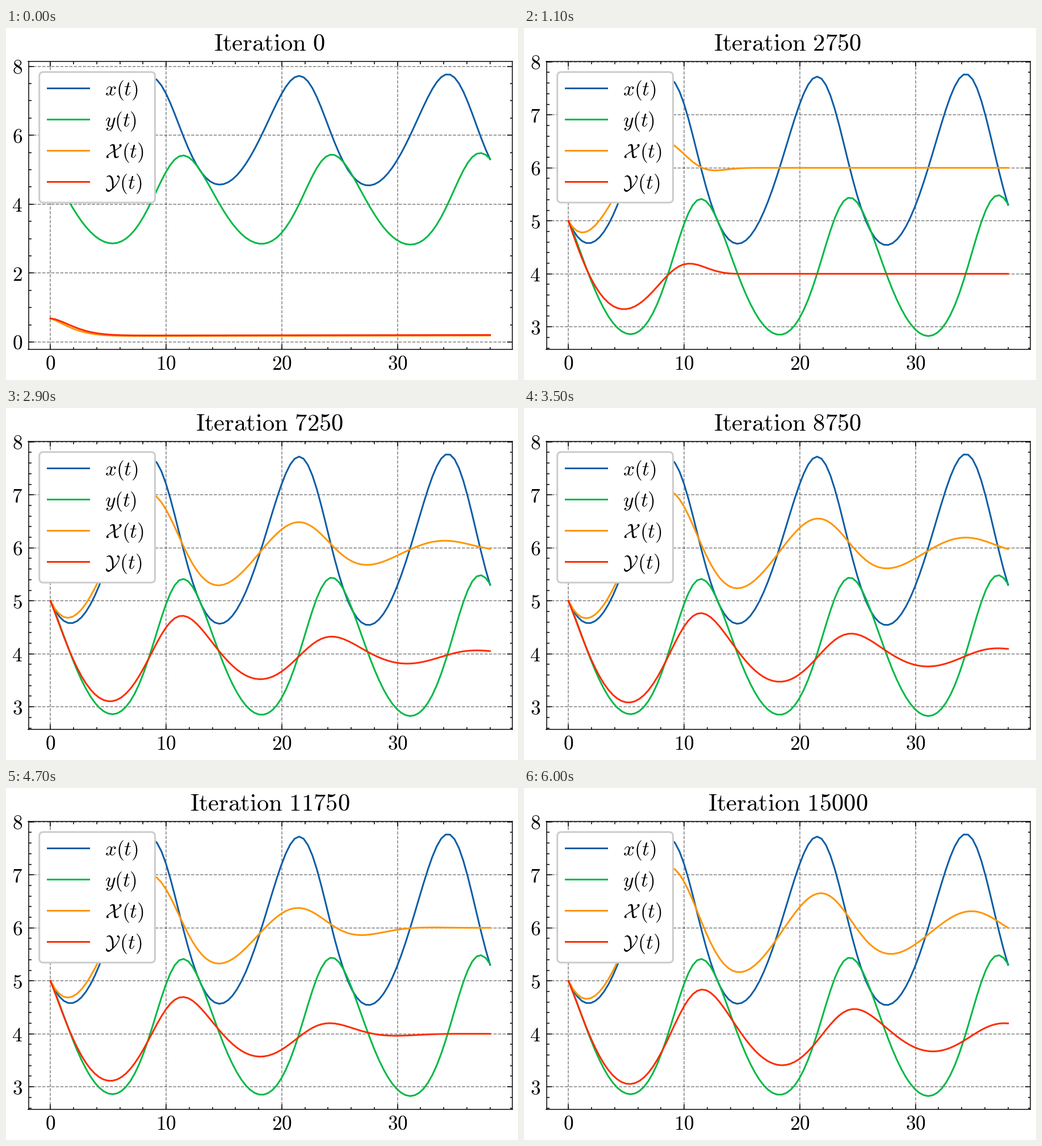
Recreate the animation shown at these times as a matplotlib script. Size 902x621 px, loop 6.1 s.

```python
import numpy as np
import matplotlib.pyplot as plt
from matplotlib.animation import FuncAnimation
from matplotlib.patches import FancyBboxPatch
from matplotlib.ticker import AutoMinorLocator, MaxNLocator, MultipleLocator

W, H, DPI = 902, 621, 100
PT = 72 / DPI  # points per pixel
BLUE, GREEN, ORANGE, RED = "#0C5DA5", "#00B945", "#FF9500", "#FF2C00"
TEXT = 35.4 * PT
TITLE = 42.7 * PT
FRAMES, STEP = 61, 250
REST = np.array([[6.0], [4.0]])  # equilibrium of the two populations

plt.rcParams["mathtext.fontset"] = "cm"

fine = np.linspace(0, 38, 991)
t = fine[::10]


def rate(time, s):
    """Predator-prey flow with a slight drift in speed and size."""
    x, y = s
    flow = np.array([x * (0.4 - 0.1 * y), y * (0.1 * x - 0.6)])
    return (1 + 2.3e-4 * time) * flow + 7e-5 * time * (s - REST[:, 0])


def solve():
    """Midpoint integration from (5, 5)."""
    h = fine[1]
    path = [np.array([5.0, 5.0])]
    for time in fine[:-1]:
        s = path[-1]
        half = s + rate(time, s) * h / 2
        path.append(s + rate(time + h / 2, half) * h)
    return np.array(path).T


orbit = solve()
swing = np.log(orbit / REST)
truth = orbit[:, ::10]

# untrained network: both outputs sink to a low plateau
START = np.array([0.168 + 0.51 * np.exp(-(t / 2.2) ** 1.4),
                  0.185 + 0.5 * np.exp(-(t / 2.6) ** 1.6)]) + 0.0005 * t

# training stages: frame, decay time, reach of the fit, time lag
STAGES = np.array([
    (3, 3, 5, 0.01),
    (11, 8.5, 12, 0.01),
    (20, 13, 18, 0.01),
    (29, 19, 37, 0.01),
    (37, 22, 40, 0.015),
    (40, 15.2, 20.8, 0.01),
    (53, 21, 33, 0.022),
    (60, 25, 45, 0.023),
]).T


def fitted(n):
    """True swing, damped and cut off beyond the reach of the fit."""
    decay, reach, lag = (np.interp(n, STAGES[0], p) for p in STAGES[1:])
    size = np.exp(-t / decay - (t / reach) ** 6)
    late = np.array([np.interp(t / (1 + lag), fine, s) for s in swing])
    learned = min(n / 3, 1)
    return (1 - learned) * START + learned * REST * np.exp(size * late)


fig = plt.figure(figsize=(W / DPI, H / DPI), dpi=DPI, facecolor="white")
ax = fig.add_axes([39.5 / W, 1 - 566.5 / H, 852 / W, 507.5 / H])
ax.set_xlim(-1.9, 39.9)
ax.set_axisbelow(True)
ax.grid(True, color="black", alpha=0.5, lw=1.5 * PT, ls="--")
ax.xaxis.set_major_locator(MultipleLocator(10))
ax.xaxis.set_minor_locator(MultipleLocator(2))
ax.yaxis.set_major_locator(MaxNLocator(7, steps=[1, 2, 2.5, 5, 10]))
ax.yaxis.set_minor_locator(AutoMinorLocator())
for axis in (ax.xaxis, ax.yaxis):
    axis.set_major_formatter(lambda v, _: f"${v:g}$")
ax.tick_params(which="both", direction="in", top=True, right=True, width=1.5 * PT)
ax.tick_params(which="major", length=9 * PT, labelsize=TEXT)
ax.tick_params(which="minor", length=4.5 * PT)
ax.tick_params(axis="x", pad=9.5 * PT)
ax.tick_params(axis="y", pad=10.5 * PT)
for spine in ax.spines.values():
    spine.set_linewidth(1.5 * PT)

true_x, true_y, line_x, line_y = (
    ax.plot(t, values, color=color, lw=3 * PT)[0]
    for values, color in zip([*truth, *START], [BLUE, GREEN, ORANGE, RED]))

# overlay in pixel coordinates for the title and the legend
top = fig.add_axes([0, 0, 1, 1])
top.set_xlim(0, W)
top.set_ylim(H, 0)
top.axis("off")
title = top.text(464.5, 40.3, "", fontsize=TITLE, ha="center", va="baseline")
top.add_patch(FancyBboxPatch((58.7, 77.7), 203.8, 230.3,
                             boxstyle="round,pad=0,rounding_size=7",
                             fc="white", ec="0.8", lw=3 * PT))
LEGEND = [(BLUE, "x"), (GREEN, "y"),
          (ORANGE, r"\mathcal{X}\hspace{0.16}"), (RED, r"\mathcal{Y}\hspace{0.1}")]
for row, (color, name) in enumerate(LEGEND):
    y = 105.7 + 55 * row
    top.plot([73, 145.5], [y, y], color=color, lw=3 * PT)
    top.text(174, y + 13.4, f"${name}(t)$", fontsize=TEXT, va="baseline")


def draw(n):
    fit = fitted(n)
    line_x.set_ydata(fit[0])
    line_y.set_ydata(fit[1])
    low = min(truth.min(), fit.min())
    high = max(truth.max(), fit.max())
    margin = 0.05 * (high - low)
    ax.set_ylim(low - margin, high + margin)
    title.set_text(rf"$\mathrm{{Iteration\ {n * STEP}}}$")
    return line_x, line_y, title


anim = FuncAnimation(fig, draw, frames=FRAMES, interval=100, repeat=True)
plt.show()
```
